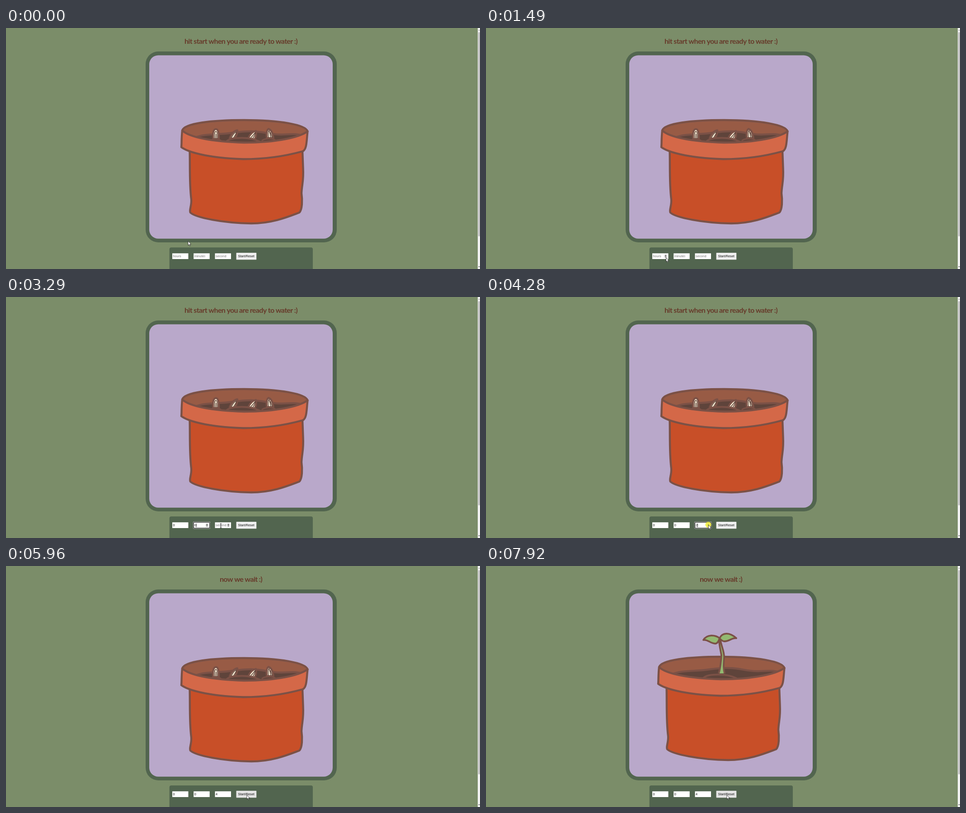
An HTML page with a canvas that plays this animation: 1049x534 px, repeating every 8000 ms.

```html
<!DOCTYPE html>
<html lang="en">
<head>
<meta charset="utf-8">
<title>Watering timer</title>
<style>
  html, body { margin: 0; width: 100%; height: 100%; overflow: hidden; background: #7b8d69; }
  canvas { display: block; }
</style>
</head>
<body>
<canvas id="stage" width="1049" height="534"></canvas>
<script>
const ctx = document.getElementById('stage').getContext('2d');
const LOOP = 8000;
const UI_FONT = '7.28px "Liberation Sans", Arial, sans-serif';
const LINE = '#7b5146', SOIL = '#5f443b', LEAF = '#93b971', CREAM = '#f6ead3';
const PANEL = '#52654f';

const path = d => new Path2D(d);

const pot = {
  body: path('M406.5 270C407.5 305 405.5 345 410 380C411 394 405 404 408 409C420 420 480 432.5 543 433C590 433 625 418 649 409C656 403 656 380 654 366C655 345 659 340 657.5 310L656 270Z'),
  bowl: path('M390 227C395 211 455 204 527 204C605 204 663 214 667.5 229C650 242 600 254 527 254C455 252 405 242 390 227Z'),
  soil: path('M419 243C435 235 460 236 485 234C505 232 525 228 545 229C570 229 585 237 610 236C630 235 645 234 654 238C640 248 600 258 527 258C470 256 435 250 419 243Z'),
  mound: path('M487 252C493 245 505 243.5 522 243.5C540 243.5 552 247 562 252'),
  rim: path('M390 227C388 245 389 255 388 264C400 273 440 288 525 290.5C580 290.5 625 282 657 273C666 268 665 250 667.5 229C650 242 600 254 527 254C455 252 405 242 390 227Z')
};

// Each seed: shell outline and its dark stripes.
const seeds = [
  ['M458.5 246C457 234 459 224 464.5 224C470 224 471.5 235 471 246Z',
   'M462 244C461 236 462 229 464.5 229C467 229 468 237 468 245M465 235V244'],
  ['M495 244C499 234 504 228 512 226.5C513 234 509 241 506 246Z',
   'M499 243C502 236 506 232 510 230M503 244C506 240 509 236 510 231'],
  ['M536 244C541 234 546 229 553 228C555 234 553 242 550 247Z',
   'M541 244C546 239 549 235 552 231M546 245C549 241 551 237 552 232'],
  ['M577.5 244C576 234 577 226 581 223.5C588 226 591 236 592 244Z',
   'M581 243C580 236 580 230 582 227M586 243C585 236 584 231 582 227M589.5 243L585 231']
].map(pair => pair.map(path));

// Sprout pieces are relative to the foot of the stem.
const stem = path('M-6 0C-2 -12 -1 -25 0 -40C-2 -52 -5 -63 -5 -74L-2 -73C0 -60 6 -50 6 -36C5 -20 4 -12 7 0');
const leaves = [
  path('M-4 -78C-14 -86 -32 -87 -40 -74C-30 -76 -25 -66 -13 -66C-8 -67 -6 -72 -4 -78Z'),
  path('M-4 -78C2 -91 18 -92 33 -78C22 -79 18 -71 6 -71C1 -72 -2 -75 -4 -78Z')
];

const fields = [
  { x: 368, hint: 'hours', from: 1780, to: 2880, caretEnd: 2300 },
  { x: 415.2, hint: 'minutes', from: 2880, to: 4040, caretEnd: 3580 },
  { x: 462.5, hint: 'seconds', from: 4040, to: 5880, caretEnd: 5170 }
];
const addTimes = [4040, 4280, 4540, 4820];
const clicks = [[1780, 100], [2880, 100], [4040, 60], [4280, 100],
                [4540, 100], [4820, 100], [5880, 80]];

// Pointer stops: time, x, y.
const stops = [
  [0, 402.5, 472], [50, 402.5, 472], [70, 401.8, 472], [640, 401.8, 472],
  [940, 398.5, 514], [1040, 398, 517], [1320, 398, 508.5],
  [1490, 398, 508.5], [1530, 398.3, 508], [1890, 398.3, 508],
  [2090, 420, 507], [2370, 444, 508.5], [2670, 444, 508.5], [2690, 444.3, 508],
  [2990, 444.3, 508], [3290, 475.5, 506.5], [3390, 481, 506],
  [3570, 481, 506], [3810, 491.8, 504.8], [5160, 491.8, 504.8],
  [5340, 532.4, 507], [LOOP, 532.4, 507]
];

function pointerAt(t) {
  const i = stops.findIndex(s => s[0] > t);
  const [t0, x0, y0] = stops[i - 1], [t1, x1, y1] = stops[i];
  const k = (t - t0) / (t1 - t0), e = k * k * (3 - 2 * k);
  return { x: x0 + (x1 - x0) * e, y: y0 + (y1 - y0) * e };
}

function box(x, y, w, h, r, color) {
  ctx.fillStyle = color;
  ctx.beginPath();
  ctx.roundRect(x, y, w, h, r);
  ctx.fill();
}

function shape(p, fill, width = 4.4) {
  ctx.fillStyle = fill;
  ctx.fill(p);
  ctx.strokeStyle = LINE;
  ctx.lineWidth = width;
  ctx.stroke(p);
}

function triangle(x, y, w, h, color) {
  ctx.fillStyle = color;
  ctx.beginPath();
  ctx.moveTo(x - w / 2, y);
  ctx.lineTo(x + w / 2, y);
  ctx.lineTo(x, y - h);
  ctx.fill();
}

function label(text, x, color) {
  ctx.font = UI_FONT;
  ctx.fillStyle = color;
  ctx.fillText(text, x, 508.1);
}

function drawTitle(t) {
  ctx.font = 'bold 16px Lato, "Open Sans", sans-serif';
  ctx.fillStyle = '#673b2b';
  ctx.textAlign = 'center';
  ctx.letterSpacing = '-0.65px';
  ctx.fillText(t < 5940 ? 'hit start when you are ready to water :)' : 'now we wait :)', 520, 35);
  ctx.letterSpacing = '0px';
  ctx.textAlign = 'left';
}

function drawSprout(size) {
  ctx.save();
  ctx.translate(521, 238);
  ctx.scale(size, size);
  const w = 3.8 / size;
  shape(stem, LEAF, w);
  leaves.forEach(p => shape(p, LEAF, w));
  ctx.restore();
}

function drawPot(t) {
  const sprouted = t >= 7000;
  ctx.lineJoin = 'round';
  ctx.save();
  if (sprouted) ctx.translate(-7, -3);
  shape(pot.body, '#c84f28');
  shape(pot.bowl, '#985b45');
  shape(pot.soil, SOIL);
  if (!sprouted) {
    for (const [shell, stripes] of seeds) {
      shape(shell, CREAM, 4);
      ctx.strokeStyle = SOIL;
      ctx.lineWidth = 1.6;
      ctx.stroke(stripes);
    }
    shape(path('M453 250C456 245 472 245 476 250'), SOIL, 3);
    shape(path('M566 250C572 244 588 244 596 248'), SOIL, 3);
  }
  shape(pot.mound, SOIL, 4);
  shape(pot.rim, '#d46848');
  ctx.restore();
  if (sprouted) drawSprout(t < 7920 ? 0.69 : 1);
}

function drawField(f, i, t, mouse) {
  const focus = t >= f.from && t < f.to;
  const hover = mouse.x >= f.x && mouse.x <= f.x + 36 && mouse.y > 499 && mouse.y < 518;
  if (focus) {
    box(f.x - 1.4, 497.8, 38.2, 15.6, 2, '#e8ebe7');
    box(f.x - 0.8, 498.4, 37, 14.4, 1.5, '#111');
    box(f.x + 0.5, 499.7, 34.4, 11.8, 0.5, '#fff');
  } else {
    box(f.x, 499.2, 35.5, 12.8, 0, '#fff');
  }
  if (t >= f.from) {
    const value = i < 2 ? '0' : String(addTimes.filter(a => t >= a).length);
    label(value, f.x + 1.5, '#111');
    if (focus && t < f.caretEnd) box(f.x + 5.6, 502, 0.8, 8, 0, '#111');
  } else {
    ctx.save();
    ctx.beginPath();
    ctx.rect(f.x, 499, 25.6, 13);
    ctx.clip();
    label(f.hint, f.x + 1.5, '#757575');
    ctx.restore();
  }
  if (focus || hover) {
    box(f.x + 25.6, 500.7, 8, 9.8, 0, '#f0f0f0');
    triangle(f.x + 29.6, 505, 4.6, 2.4, '#4c4c4c');
    triangle(f.x + 29.6, 506.2, 4.6, -2.4, '#4c4c4c');
  }
}

function drawPointer({ x, y }) {
  const overText = y > 499 && y < 512 && fields.some(f => x >= f.x && x < f.x + 25);
  if (overText) {
    box(x - 0.5, y - 4.5, 1, 9.5, 0, '#222');
    box(x - 1.7, y - 5, 3.4, 0.8, 0, '#222');
    box(x - 1.7, y + 4.6, 3.4, 0.8, 0, '#222');
    return;
  }
  ctx.save();
  ctx.translate(x + 0.5, y + 0.3);
  const arrow = path('M0 0V9.2L2.1 7.3L3.6 10.7L5.1 10L3.6 6.7H6.5Z');
  ctx.fillStyle = '#fff';
  ctx.strokeStyle = '#111';
  ctx.lineWidth = 0.7;
  ctx.fill(arrow);
  ctx.stroke(arrow);
  ctx.restore();
}

function drawControls(t) {
  const mouse = pointerAt(t);
  box(361.7, 486.3, 317.3, 60, 4, PANEL);
  fields.forEach((f, i) => drawField(f, i, t, mouse));
  const over = mouse.x > 509.7;
  box(509.5, 498, 44.8, 15.4, 1, '#d6d6d3');
  box(510.2, 498.6, 43.4, 14.2, 0.5, over ? '#e5e5e5' : '#f0f0f0');
  label('Start/Reset', 513.4, '#111');
  if (clicks.some(([at, hold]) => t >= at && t < at + hold)) {
    ctx.fillStyle = 'rgba(240,238,40,.75)';
    ctx.beginPath();
    ctx.arc(mouse.x + 0.2, mouse.y - 0.3, 6.6, 0, 7);
    ctx.fill();
  }
  drawPointer(mouse);
}

function drawScrollbar() {
  box(1044, 0, 5, 534, 0, '#f1f1f1');
  box(1045, 9.5, 4, 452, 0, '#c1c1c1');
  triangle(1047, 6, 3.4, 2.2, '#a3a3a3');
  triangle(1047, 528, 3.4, -2.2, '#505050');
}

function draw() {
  const t = performance.now() % LOOP;
  box(0, 0, 1049, 534, 0, '#7b8d69');
  drawTitle(t);
  box(309, 52, 423, 423, 28, PANEL);
  box(317, 60.5, 406, 406.3, 20, '#b9a8ca');
  drawPot(t);
  drawControls(t);
  drawScrollbar();
  requestAnimationFrame(draw);
}
draw();
</script>
</body>
</html>
```
